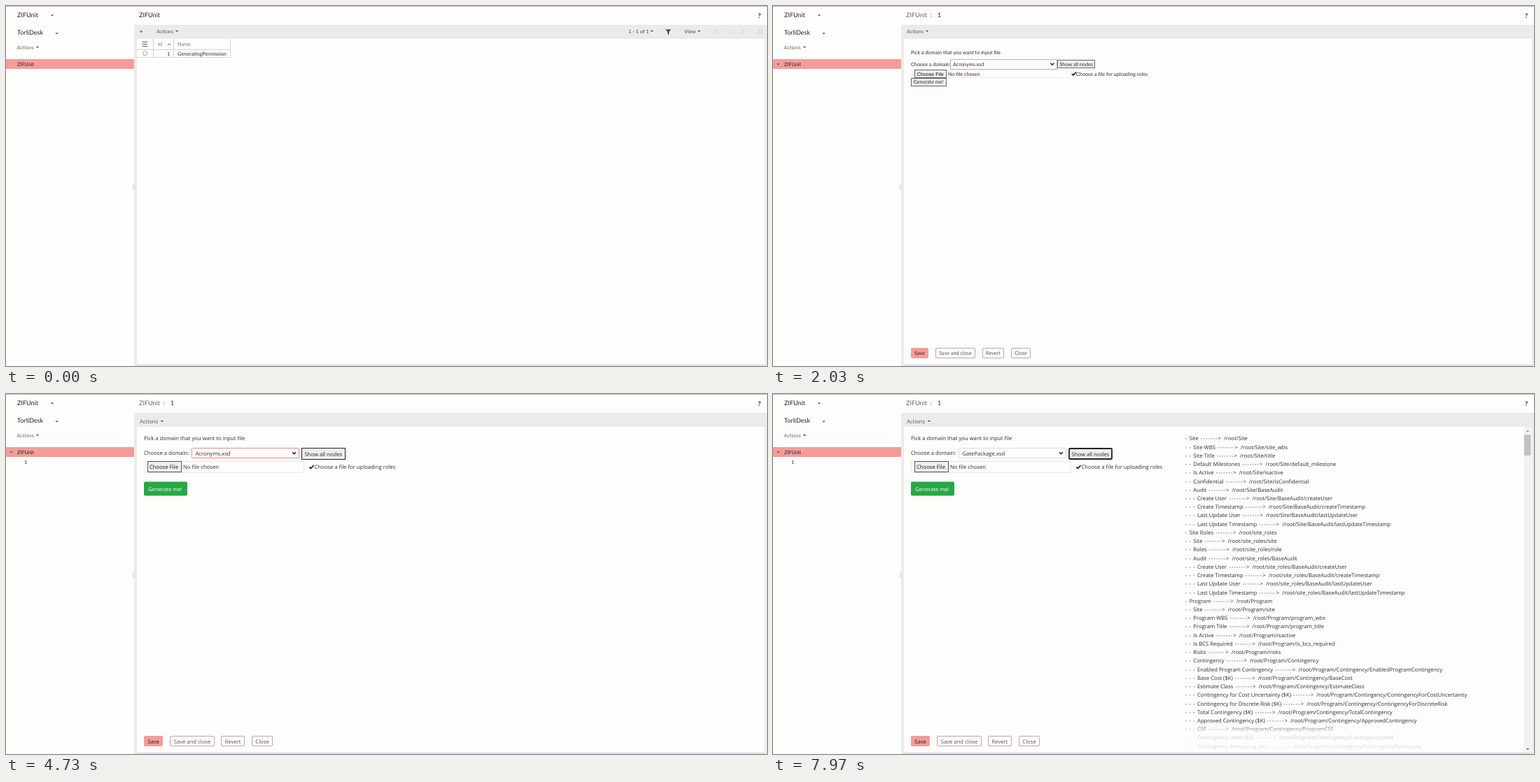
Write an HTML page that moves like this. It is 1087 px wide and 515 px high and loops after 8000 ms.

```html
<!DOCTYPE html>
<html lang="en">
<head>
<meta charset="utf-8">
<title>Role generator demo</title>
<style>
  html, body { margin: 0; width: 100%; height: 100%; overflow: hidden; background: #fdfdfc; }
  svg { display: block; width: 1087px; height: 515px; }
  text { white-space: pre; text-rendering: geometricPrecision; }
  .lato { font-family: Lato, sans-serif; }
  .open { font-family: "Open Sans", sans-serif; }
  .arial { font-family: "Liberation Sans", Arial, sans-serif; }
  .dash { letter-spacing: .6px; }
  .arrow { letter-spacing: 1.05px; }
</style>
</head>
<body>
<svg id="stage" viewBox="0 0 1087 515">
  <defs>
    <linearGradient id="fade" x2="0" y2="1">
      <stop offset="0" stop-color="#fdfdfc" stop-opacity="0"/>
      <stop offset=".25" stop-color="#fdfdfc" stop-opacity=".75"/>
      <stop offset="1" stop-color="#fdfdfc" stop-opacity=".88"/>
    </linearGradient>
  </defs>
</svg>
<script>
const LOOP = 8000, APP = 'ZIFUnit', SPACE = 'TorliDesk';
const PAGE = '#fdfdfc', GREY = '#ebebec', PINK = '#f49c9a', INK = '#2c2c2c';
const stage = document.getElementById('stage');

// Drawing helpers; text is placed by the middle of its capitals.
const label = (cls, size) => (x, y, s, fill = INK, extra = '') =>
  `<text class="${cls}" x="${x}" y="${y + size * .36}" font-size="${size}" fill="${fill}" ${extra}>${s}</text>`;
const lato = label('lato', 7.25), title = label('lato', 9.06);
const open = label('open', 7.7), arial = label('arial', 7.2);
const box = (x1, y1, x2, y2, fill, stroke = 'none', extra = '') =>
  `<rect x="${x1}" y="${y1}" width="${x2 - x1}" height="${y2 - y1}" fill="${fill}" stroke="${stroke}" ${extra}/>`;
const line = (d, stroke = '#666', w = 1) => `<path d="${d}" fill="none" stroke="${stroke}" stroke-width="${w}"/>`;
const caret = (x, y, fill = '#444', r = 2.2, up = 1) =>
  `<path d="M${x - r} ${y - up * r / 2}h${2 * r}l${-r} ${up * r}z" fill="${fill}"/>`;
const chevron = (x, y) => line(`M${x - 2.5} ${y - 1.2}l2.5 2.5l2.5 -2.5`, '#222', 1.5);
const tick = (x, y) => line(`M${x} ${y}l2 2l4 -4.5`, '#222', 1.8);
const group = (id, body) => `<g id="${id}">${body}</g>`;

const frame = [
  box(0, 0, 1087, 515, PAGE), box(0, 0, 1087, 1, '#dcaabd'),
  title(16, 13, APP, '#222'), caret(66, 13.5), title(16, 38, SPACE, '#222'), caret(72.5, 39.5),
  lato(15.5, 59, 'Actions', '#666'), caret(45, 59),
  box(0, 76, 183, 90, PINK), lato(16, 83, APP, '#222'),
  box(183, 27, 1087, 515, GREY),
  line('M181.5 255v8M183.5 255v8', '#ccc', .8),
  title(1074, 13.5, '?', '#222', 'font-weight="700"'),
].join('');

const panel = box(187, 47, 1084, 513, PAGE) + box(187, 513, 1084, 514.2, '#d6d0e4');

const table = [
  panel, lato(191, 36, '+', '#333', 'font-weight="700"'),
  lato(215, 36, 'Actions', '#555'), caret(244, 36),
  lato(889, 36, '1 - 1 of 1', '#444'), caret(922.5, 36),
  '<path d="M942 33.5h8l-3 3.5v4l-2 -1v-3z" fill="#444"/>',
  lato(969, 36, 'View', '#444'), caret(990, 36),
  line('M1011.5 33.5v6M1017 33.5l-3 3l3 3M1040.5 33.5l-3 3l3 3M1051 33.5l3 3l-3 3M1074 33.5l3 3l-3 3M1079.5 33.5v6', '#c8c8c8'),
  line('M187 62.5H321M187 73.5H321M210.5 47V73M239.5 47V73M320.5 47V73', '#d4d4d4'),
  line('M194.5 51.5h7.5M194.5 54.5h7.5M194.5 57.5h7.5', '#555'),
  lato(217, 54, 'Id', '#777'), line('M231 56l2 -2l2 2', '#666'), lato(245, 54, 'Name', '#777'),
  box(196, 65, 201.5, 70.5, PAGE, '#999', 'rx="1" stroke-width=".8"'),
  lato(230, 68, '1'), lato(245, 68, 'GeneratingPermission'),
].join('');

const formHead = title(190, 13, APP + '&#160;&#160;:', '#666') + title(235, 13, '1', '#222') + caret(7.5, 83.5) + panel;

// Bottom buttons: [left, right, caption]
const footer = (text, y, items) => items.map(([x1, x2, s], i) =>
  box(x1 + .5, 489.5, x2 - .5, 503.5, i ? PAGE : PINK, i ? '#c3a3ae' : PINK, 'rx="1.5"') +
  text((x1 + x2) / 2, y, s, i ? '#555' : '#222', 'text-anchor="middle"')).join('');

const plainForm = [
  formHead, lato(191, 36, 'Actions', '#555'), caret(220, 36),
  lato(197, 66, 'Pick a domain that you want to input file'),
  lato(197, 83, 'Choose a domain:'),
  box(253.5, 76.5, 405.5, 90.5, PAGE, '#e3a5a8'), lato(257, 83, 'Acronyms.xsd'), chevron(399, 83),
  box(406.5, 77.5, 459.5, 88.5, '#efefef', '#666'), lato(409.5, 83, 'Show all nodes'),
  box(198.5, 91.5, 425.5, 102.5, PAGE, '#ddd', 'stroke-dasharray="1 1"'),
  box(202.5, 91.5, 247.5, 102.5, '#efefef', '#666'), arial(205.5, 97, 'Choose File', '#111'),
  lato(250, 97, 'No file chosen'), tick(427, 97), lato(433, 97, 'Choose a file for uploading roles'),
  box(197.5, 103.5, 247.5, 114.5, '#efefef', '#666'), lato(200.5, 108.5, 'Generate me!'),
  footer(lato, 496, [[197, 222, 'Save'], [232, 289, 'Save and close'], [299, 330, 'Revert'], [340, 368, 'Close']]),
].join('');

// Node listing: [depth, caption, path]
const camel = s => s[0].toLowerCase() + s.slice(1).replace(/ /g, '');
const audit = base => [[2, 'Audit', base + '/BaseAudit'],
  ...['Create User', 'Create Timestamp', 'Last Update User', 'Last Update Timestamp']
    .map(s => [3, s, `${base}/BaseAudit/${camel(s)}`])];
const under = (base, depth, rows) => rows.map(([s, p]) => [depth, s, `${base}/${p}`]);
const nodes = [
  [1, 'Site', 'Site'],
  ...under('Site', 2, [['Site WBS', 'site_wbs'], ['Site Title', 'title'], ['Default Milestones', 'default_milestone'],
    ['Is Active', 'isactive'], ['Confidential', 'isConfidential']]),
  ...audit('Site'),
  [1, 'Site Roles', 'site_roles'],
  ...under('site_roles', 2, [['Site', 'site'], ['Roles', 'role']]),
  ...audit('site_roles'),
  [1, 'Program', 'Program'],
  ...under('Program', 2, [['Site', 'site'], ['Program WBS', 'program_wbs'], ['Program Title', 'program_title'],
    ['Is Active', 'isactive'], ['Is BCS Required', 'is_bcs_required'], ['Risks', 'risks'], ['Contingency', 'Contingency']]),
  ...under('Program/Contingency', 3, [['Enabled Program Contingency', 'EnabledProgramContingency'],
    ['Base Cost ($K)', 'BaseCost'], ['Estimate Class', 'EstimateClass'],
    ['Contingency for Cost Uncertainty ($K)', 'ContingencyForCostUncertainty'],
    ['Contingency for Discrete Risk ($K)', 'ContingencyForDiscreteRisk'],
    ['Total Contingency ($K)', 'TotalContingency'], ['Approved Contingency ($K)', 'ApprovedContingency'],
    ['CSF', 'ProgramCSF'], ['Contingency Used ($K)', 'ContingencyUsed'],
    ['Contingency Remaining ($K)', 'ContingencyRemaining']]),
];
const spaced = (cls, s) => `<tspan class="${cls}">${s}</tspan>`;
const listing = nodes.map(([depth, s, path], i) =>
  open(589, 63.6 + i * 12.23, `${spaced('dash', '- '.repeat(depth))}${s}${spaced('arrow', ' -------&gt; ')}/root/${path}`)).join('') +
  box(187, 473, 1072, 513, 'url(#fade)') +
  box(1072.5, 47, 1083, 513, '#f1f1f1') + box(1073, 58.5, 1082.5, 88, '#c1c1c1') +
  caret(1078, 53, '#888', 2.2, -1) + caret(1078, 508, '#444');

const styledForm = [
  formHead, lato(26, 97.5, '1'), open(191, 39, 'Actions', '#555'), caret(223, 39),
  open(197, 63.7, 'Pick a domain that you want to input file'),
  open(197, 84.3, 'Choose a domain:'),
  box(265.5, 77.5, 418.5, 91.5, PAGE, '#e58b8b', 'id="select" rx="1"'),
  open(270.5, 85.3, '', INK, 'id="value"'), chevron(411.5, 84.5),
  group('showIdle', box(422.5, 77.5, 484.5, 93.5, '#efefef', '#222')),
  group('showFocus', box(423, 78, 484, 93, '#efefef', '#222', 'rx="1" stroke-width="1.8"')),
  open(426.5, 86, 'Show all nodes', '#222'),
  box(197.5, 96.5, 425.5, 112.5, PAGE, '#e8e8e8'),
  box(202.5, 96.5, 250.5, 111.5, '#efefef', '#555'), open(205, 104.5, 'Choose File', '#111'),
  open(253, 104.5, 'No file chosen'), tick(433.5, 104.5), open(440.5, 104.5, 'Choose a file for uploading roles'),
  box(197, 125.5, 259, 145.5, '#28a745', 'none', 'rx="2"'), open(203, 136.2, 'Generate me!', '#fff'),
  group('listing', listing),
  footer(open, 497.5, [[197, 224, 'Save'], [234, 298, 'Save and close'], [307, 341, 'Revert'], [351, 381, 'Close']]),
].join('');

const domains = ('Acronyms ActualHours Attachments BCS CSDR DailyUpdate DataIntegrity Decision DocReview Documents ' +
  'DU ZIF ESLNR Estimating Forecast GatePackage GateProgression GateTracker IIP InService')
  .split(' ').map(s => s + '.xsd');
const ROW = 11.56;
const dropdown = box(265.5, 94.5, 419, 326.5, PAGE, '#aaa') +
  box(266, 95, 407, 106.5, '#757575', 'none', 'id="hover"') +
  domains.map((s, i) => open(270.5, 101.2 + i * ROW, s, INK, 'data-item')).join('') +
  box(407, 95, 418.5, 326, '#f1f1f1') + box(408, 107, 417.5, 197, '#c1c1c1') +
  caret(412.7, 101, '#999', 2.2, -1) + caret(412.7, 320.5);

const status = '<path d="M0 502H359q2 0 2 2V515H0z" fill="#cbcbcb"/>' + open(3.5, 509.5, 'Waiting for cache...', '#222');

stage.insertAdjacentHTML('beforeend', frame +
  group('listTitle', title(190, 13, APP, '#222')) + group('table', table) +
  group('plain', plainForm) + group('styled', styledForm) +
  group('dropdown', dropdown) + group('status', status));

const $ = id => document.getElementById(id);
const items = [...stage.querySelectorAll('[data-item]')];
const show = (id, on) => { $(id).style.display = on ? '' : 'none'; };
const within = (t, a, b) => t >= a && t < b;

// Dropdown openings: [start, end, first row, last row]
const openings = [[2900, 3800, 0, 0], [4830, 5300, 0, 11], [6830, 7300, 11, 15]];

function render(t) {
  show('listTitle', t < 1700);
  show('table', t < 900);
  show('status', within(t, 600, 1750));
  show('plain', within(t, 1750, 2350));
  show('styled', t >= 2350);
  show('listing', t >= 5600);

  const current = openings.find(([a, b]) => within(t, a, b));
  show('dropdown', current);
  if (current) {
    const [a, b, from, to] = current;
    const row = Math.round(from + (to - from) * Math.min(1, (t - a) / (b - a) * 1.25));
    $('hover').setAttribute('y', 95 + row * ROW);
    items.forEach((el, i) => el.setAttribute('fill', i === row ? '#fff' : INK));
  }

  $('value').textContent = domains[t < 5300 ? 0 : t < 7300 ? 11 : 15];
  const buttonFocus = within(t, 5500, 6780) || t >= 7550;
  $('select').setAttribute('stroke', buttonFocus ? '#ddd' : '#e58b8b');
  show('showIdle', !buttonFocus);
  show('showFocus', buttonFocus);
}

const start = performance.now();
function loop() {
  render((performance.now() - start) % LOOP);
  requestAnimationFrame(loop);
}
loop();
</script>
</body>
</html>
```
